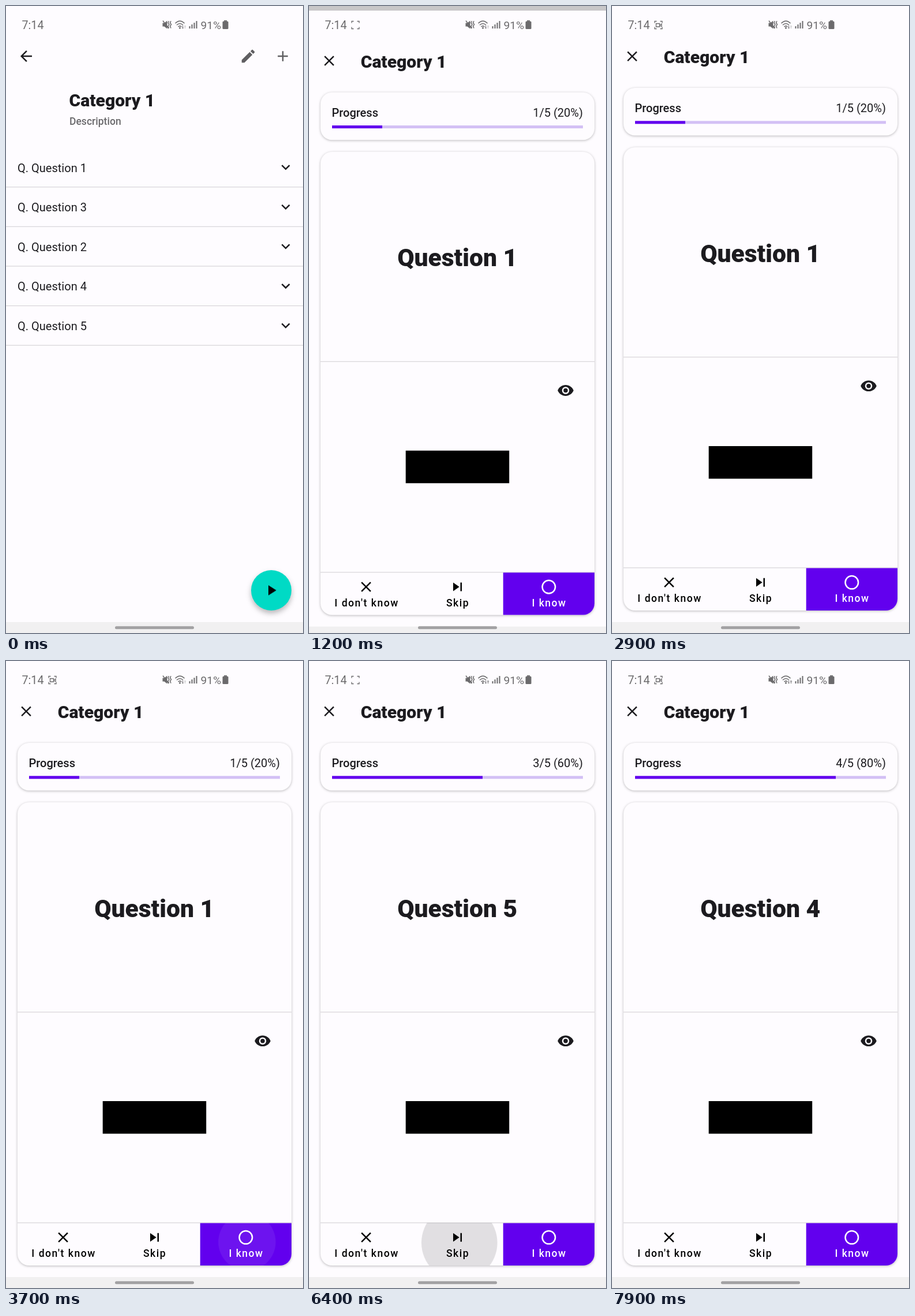
An HTML page that plays this animation: 515 by 1087 pixels, repeating every 8 s.

```html
<!DOCTYPE html>
<html lang="en">
<head>
<meta charset="utf-8">
<title>Flash cards</title>
<style>
  html, body { margin: 0; width: 100%; height: 100%; overflow: hidden; background: #fefcff; }
  #stage { position: relative; width: 515px; height: 1087px; overflow: hidden; }
  #stage > * { position: absolute; left: 0; top: 0; width: 515px; height: 1087px; }
  #list, #sheet { background: #fefcff; }
  #scrim { background: #000; opacity: 0; }
  text { font-family: Roboto, sans-serif; fill: #1c1b1f; white-space: pre; }
  .heavy { font-weight: 800; }
  .medium { font-weight: 500; }
  .middle { text-anchor: middle; }
  .end { text-anchor: end; }
  .label { font-weight: 500; letter-spacing: 1.5px; text-anchor: middle; fill: #000; }
  .card { fill: #fefcff; filter: drop-shadow(0 1.5px 2px rgba(0, 0, 0, .27)); }
  .fab { fill: #00dac5; filter: drop-shadow(0 5px 5px rgba(0, 0, 0, .27)); }
  .rule { fill: #dad8db; }
  .ripple { opacity: 0; }
</style>
</head>
<body>
<div id="stage">
  <svg id="list"></svg>
  <div id="scrim"></div>
  <svg id="sheet"></svg>
  <svg id="system"></svg>
</div>
<script>
const LOOP = 8000;
const DP = 1.2527;
const INK = '#1c1b1f';
const $ = id => document.getElementById(id);

const ICONS = {
  back: 'M20 11H7.83l5.59-5.59L12 4l-8 8 8 8 1.41-1.41L7.83 13H20z',
  edit: 'M3 17.25V21h3.75L17.81 9.94l-3.75-3.75zM20.71 7.04c.39-.39.39-1.02 0-1.41l-2.34-2.34c-.39-.39-1.02-.39-1.41 0l-1.83 1.83 3.75 3.75z',
  add: 'M19 13h-6v6h-2v-6H5v-2h6V5h2v6h6z',
  down: 'M7.41 8.59L12 13.17l4.59-4.58L18 10l-6 6-6-6z',
  play: 'M8 5v14l11-7z',
  close: 'M19 6.41L17.59 5 12 10.59 6.41 5 5 6.41 10.59 12 5 17.59 6.41 19 12 13.41 17.59 19 19 17.59 13.41 12z',
  skip: 'M6 18l8.5-6L6 6zM16 6v12h2V6z',
  ring: 'M12 2a10 10 0 1 0 0 20 10 10 0 0 0 0-20zm0 18a8 8 0 1 1 0-16 8 8 0 0 1 0 16z',
  eye: 'M12 4.5C7 4.5 2.73 7.61 1 12c1.73 4.39 6 7.5 11 7.5s9.27-3.11 11-7.5c-1.73-4.39-6-7.5-11-7.5zM12 17a5 5 0 1 1 0-10 5 5 0 0 1 0 10zm0-8a3 3 0 1 0 0 6 3 3 0 0 0 0-6z'
};

// Icons are placed by the centre of their 24 dp box.
const icon = (name, cx, cy, fill = INK) =>
  `<path fill="${fill}" d="${ICONS[name]}" transform="translate(${cx - 12 * DP} ${cy - 12 * DP}) scale(${DP})"/>`;
const text = (str, x, y, size, cls = '', style = '') =>
  `<text x="${x}" y="${y}" font-size="${size}" class="${cls}" style="${style}">${str}</text>`;
const rect = (x, y, w, h, attrs = '') =>
  `<rect x="${x}" y="${y}" width="${w}" height="${h}" ${attrs}/>`;
const ripple = (id, color) => `<circle id="${id}" class="ripple" r="1" fill="${color}"/>`;
const navBar = rect(0, 1068, 515, 19, 'fill="#f1f0f1"');

const row = (n, i) => {
  const y = 280 + i * 68.6;
  return text(`Q. Question ${n}`, 20, y + 7.5, 20.04) + icon('down', 485, y - .4)
    + rect(0, y + 33.2, 515, 1.3, 'class="rule"');
};

$('list').innerHTML = `
  <clipPath id="fabClip"><circle cx="460" cy="1013" r="35"/></clipPath>
  ${icon('back', 35, 87)}${icon('edit', 420, 87, '#605f62')}${icon('add', 480, 87, '#605f62')}
  ${text('Category 1', 109.5, 174, 30.06, 'heavy')}
  ${text('Description', 110, 206, 17.54, 'medium', 'fill:#6a696c')}
  ${[1, 3, 2, 4, 5].map(row).join('')}
  ${navBar}
  <circle class="fab" cx="460" cy="1013" r="35"/>
  <g clip-path="url(#fabClip)">${ripple('fabRipple', '#000')}</g>
  ${icon('play', 460, 1013, '#000')}`;

const cards = [
  { question: 1, from: 0, to: 3750 },
  { question: 2, from: 3750, to: 6390 },
  { question: 5, from: 6390, to: 7290 },
  { question: 4, from: 7290, to: LOOP }
];
const cardView = ({ question }, i) => `<g class="state">
  ${text(`${i + 1}/5 (${(i + 1) * 20}%)`, 475, 184, 20.04, 'end')}
  ${rect(40, 199.3, 87 * (i + 1), 5, 'fill="#6200ee"')}
  ${text(`Question ${question}`, 257.2, 443.5, 42.6, 'heavy middle')}</g>`;

$('sheet').innerHTML = `
  <clipPath id="cardClip">${rect(20, 245, 475, 803, 'rx="20"')}</clipPath>
  ${[20, 178.3, 336.7].map((x, i) =>
    `<clipPath id="button${i}">${rect(x, 974.5, 158.3, 73.5)}</clipPath>`).join('')}
  ${icon('close', 35, 87.3)}
  ${text('Category 1', 89.7, 99, 30.06, 'heavy')}
  ${rect(20, 142, 475, 82.5, 'rx="20" class="card"')}
  ${text('Progress', 39.5, 184, 20.04, 'medium')}
  ${rect(40, 199.3, 435, 5, 'fill="#d3c0f5"')}
  ${rect(20, 245, 475, 803, 'rx="20" class="card"')}
  ${rect(20, 608, 475, 1.3, 'class="rule"')}
  ${icon('eye', 445, 658.7)}
  ${rect(167.7, 763, 179.5, 56.5)}
  <g clip-path="url(#cardClip)">
    ${rect(20, 973.3, 475, 1.3, 'class="rule"')}
    ${rect(336.7, 974.5, 158.3, 73.5, 'fill="#6200ee"')}
    <g clip-path="url(#button0)">${ripple('unknownRipple', '#000')}</g>
    <g clip-path="url(#button1)">${ripple('skipRipple', '#000')}</g>
    <g clip-path="url(#button2)">${ripple('knownRipple', '#fff')}</g>
  </g>
  ${icon('close', 99, 999.3, '#000')}${icon('skip', 257.5, 999.3, '#000')}${icon('ring', 415.8, 999.3, '#fff')}
  ${text("I don't know", 100, 1033, 17.54, 'label')}
  ${text('Skip', 258, 1033, 17.54, 'label')}
  ${text('I know', 416.5, 1033, 17.54, 'label', 'fill:#fff')}
  ${cards.map(cardView).join('')}
  ${navBar}`;

const GREY = '#6b6a6c';
$('system').innerHTML = `
  ${text('7:14', 27.5, 39.7, 19.7, '', `fill:${GREY}`)}
  <g id="recorder" fill="none" stroke="${GREY}" stroke-width="1.3">
    <path d="M74 29.5v-3h3.5M83.500 26.500h3.500v3M87 36.500v3h-3.500M77.500 39.500h-3.500v-3"/>
    <path id="camera" d="M76.500 30.500h6v5.500h-6zM82.500 33l3.500-2v4.500l-3.500-2"/>
  </g>
  <path fill="${GREY}" d="M271.500 29.500h3l5-4v14l-5-4h-3z"/>
  <path fill="none" stroke="${GREY}" stroke-width="1.500" d="M272 25.500l10 13.500M282.500 26l-1.500 3 2 3-2 3 1.500 3.500M286 26l-1.500 3 2 3-2 3 1.500 3.500"/>
  <g fill="none" stroke="${GREY}" stroke-width="1.600">
    <path d="M293.500 30q8-8 16 0M296 33q5.500-5 11 0M298.500 36q3-2.700 6 0"/>
  </g>
  <circle cx="301.500" cy="38" r="1.600" fill="${GREY}"/>
  <path fill="none" stroke="${GREY}" d="M306.500 34v5m-1.500-1.500l1.500 1.500 1.500-1.500"/>
  <path id="upload" fill="none" stroke="${GREY}" d="M310.500 39v-5m-1.500 1.500l1.500-1.500 1.500 1.500"/>
  ${[0, 1, 2, 3].map(i => rect(317.5 + i * 4, 35 - i * 3, 2, 4 + i * 3, `fill="${GREY}"`)).join('')}
  ${text('91%', 337.500, 39.700, 19.200, '', `fill:${GREY}`)}
  ${rect(375.5, 26.5, 10, 13.5, `rx="1.500" fill="${GREY}"`)}
  ${rect(378, 24.8, 5, 2, `fill="${GREY}"`)}
  ${rect(189, 1075.2, 137, 5, 'rx="2.500" fill="#a2a1a3"')}`;

// steps: [time in ms, properties, easing to the next step]
const play = (el, steps, duration = LOOP) => el.animate(
  steps.map(([time, props, easing = 'linear']) => ({ ...props, offset: time / duration, easing })),
  { duration, iterations: Infinity });

const show = (el, from, to, duration = LOOP, rest = 0) => play(el, [
  [0, { opacity: rest }, 'steps(1)'],
  [from, { opacity: 1 }, 'steps(1)'],
  [to, { opacity: rest }, 'steps(1)'],
  [duration, { opacity: rest }]
], duration);

const STANDARD = 'cubic-bezier(.4, 0, .2, 1)';

function press(el, start, alpha, [x, y, r], [x2, y2, r2]) {
  const small = { transform: `translate(${x}px, ${y}px) scale(${r})` };
  const large = { transform: `translate(${x2}px, ${y2}px) scale(${r2})` };
  play(el, [[0, small], [start, small, STANDARD], [start + 225, large], [LOOP, large]]);
  play(el, [
    [0, { opacity: 0 }], [start, { opacity: 0 }], [start + 75, { opacity: alpha }],
    [start + 225, { opacity: alpha }], [start + 375, { opacity: 0 }], [LOOP, { opacity: 0 }]
  ]);
}

press($('fabRipple'), 790, .14, [462, 1014, 21], [460, 1013, 48]);
press($('knownRipple'), 3673, .2, [418, 1007, 47.5], [415.8, 1011, 100]);
press($('skipRipple'), 6335, .13, [262.5, 1007, 47.5], [257.5, 1011, 100]);
press($('unknownRipple'), 7235, .13, [101, 1008, 47.5], [99, 1011, 100]);

document.querySelectorAll('.state').forEach((el, i) => show(el, cards[i].from, cards[i].to));
show($('recorder'), 300, LOOP);
show($('camera'), 500, 1000, 1000);
show($('upload'), 4600, LOOP, LOOP, .4);

// The quiz window is revealed from the bottom while it settles upwards.
const OPEN = 970;
const low = { transform: 'translateY(44.6px)' }, settled = { transform: 'none' };
const shut = { clipPath: 'inset(1087px 0 0 0)' }, open = { clipPath: 'inset(0 0 0 0)' };
play($('sheet'), [[0, low], [OPEN, low, STANDARD], [OPEN + 425, settled], [LOOP, settled]]);
play($('sheet'), [[0, shut], [OPEN, shut, STANDARD], [OPEN + 225, open], [LOOP, open]]);
play($('scrim'), [[0, { opacity: 0 }], [OPEN, { opacity: 0 }], [OPEN + 225, { opacity: .21 }], [LOOP, { opacity: .21 }]]);
</script>
</body>
</html>
```
